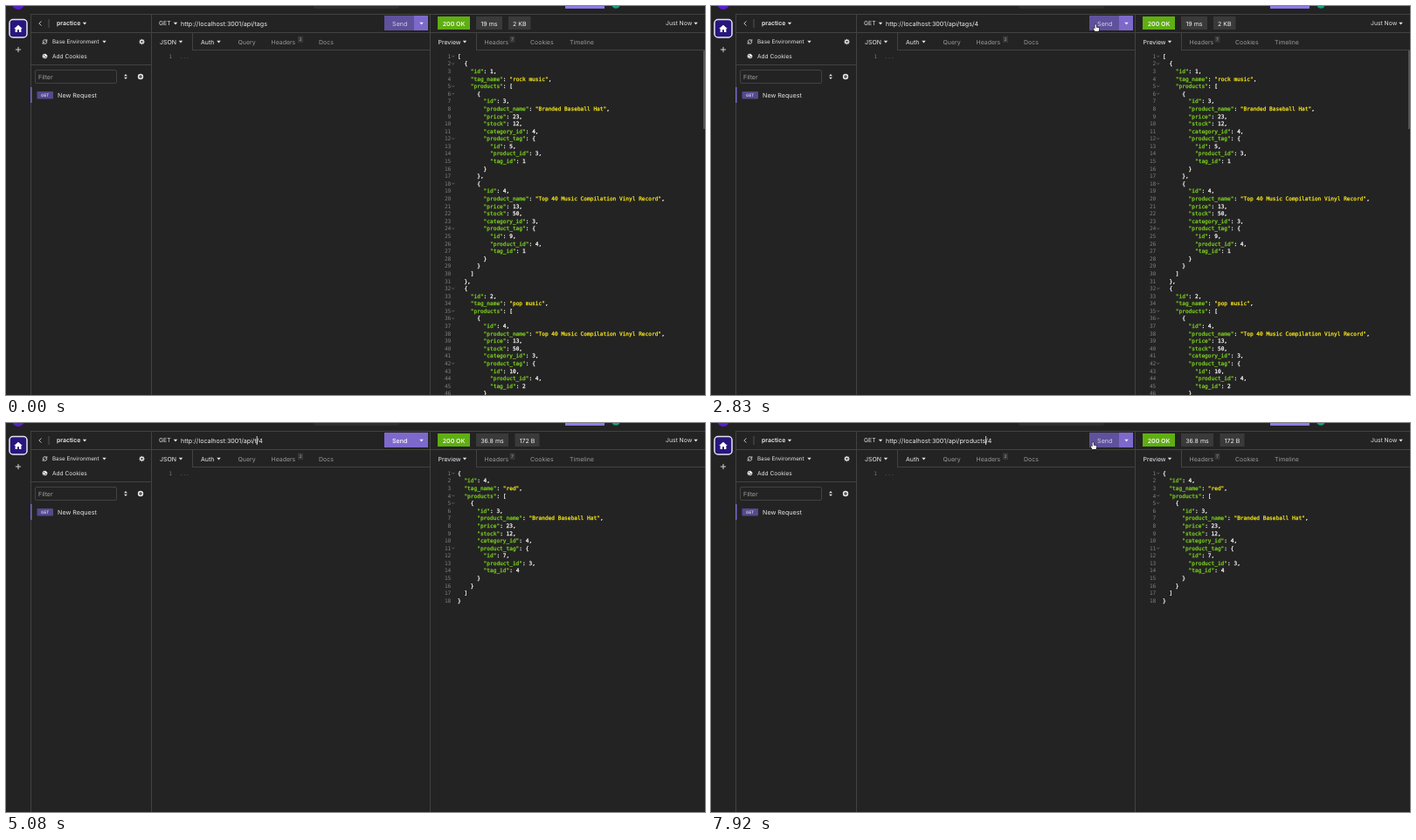
Write an HTML page with a canvas that moves like this. It is 800 px wide and 446 px high and loops after 8 s.

```html
<!DOCTYPE html>
<html lang="en">
<head>
<meta charset="utf-8">
<title>API client</title>
<style>
html, body { margin: 0; height: 100%; overflow: hidden; background: #232323; }
canvas { display: block; }
</style>
</head>
<body>
<canvas id="stage" width="800" height="446"></canvas>
<script>
const LOOP = 8000;
const ctx = document.getElementById('stage').getContext('2d');
const BG = '#232323', LINE = '#424242', TEXT = '#e4e4e4', MUTED = '#9a9a9a', PURPLE = '#7d69cb';
const UI = 'Inter, sans-serif';
const CODE = { size: 6.15, font: '"DejaVu Sans Mono", monospace' };
const CHAR = 3.702, ROW = 8.59;

// Response bodies
const hat = { id: 3, product_name: 'Branded Baseball Hat', price: 23, stock: 12, category_id: 4 };
const vinyl = { id: 4, product_name: 'Top 40 Music Compilation Vinyl Record', price: 13, stock: 50, category_id: 3 };
const tagged = (product, id, tag_id) =>
  ({ ...product, product_tag: { id, product_id: product.id, tag_id } });
const toLines = data => JSON.stringify(data, null, 2).split('\n').slice(0, 46);
const allTags = {
  time: '19 ms', size: '2 KB', boxes: [538, 30, 575, 25.5], scrolls: true,
  lines: toLines([
    { id: 1, tag_name: 'rock music', products: [tagged(hat, 5, 1), tagged(vinyl, 9, 1)] },
    { id: 2, tag_name: 'pop music', products: [tagged(vinyl, 10, 2)] }
  ])
};
const oneTag = {
  time: '36.8 ms', size: '172 B', boxes: [538, 37, 582.5, 28], scrolls: false,
  lines: toLines({ id: 4, tag_name: 'red', products: [tagged(hat, 7, 4)] })
};

// Address edits: [time, text before caret, text after caret]
const BASE = 'http://localhost:3001/api/';
const edits = [
  [0, 'tags', ''], [1000, 'tags', ''], [1750, 'tags/', ''], [1920, 'tags/4', ''],
  [4420, 'tags', '/4'], [4750, 'tag', '/4'], [4920, 'ta', '/4'], [5080, 't', '/4'], [5250, '', '/4'],
  [5580, 'p', '/4'], [5750, 'pr', '/4'], [5920, 'pro', '/4'], [6170, 'prod', '/4'], [6330, 'produ', '/4'],
  [6500, 'produc', '/4'], [6660, 'product', '/4'], [6750, 'products', '/4']
];
const RESPONSE_AT = 3080;
const focused = t => (t >= 1000 && t < 2950) || t >= 4420;

// Pointer moves: [time, x, y]; hidden outside each path
const paths = [
  [[300, 332, -8], [520, 318, 19.5], [1750, 318, 19.5]],
  [[2170, 318, 19.5], [2700, 441, 25], [3330, 441, 25], [4000, 292.5, 22], [4250, 293, 22], [4400, 300, 20], [4750, 300, 20]],
  [[7000, 300, 20], [7650, 438, 26], [8000, 438, 26]]
];

function pointerAt(t) {
  const path = paths.find(p => t >= p[0][0] && t < p[p.length - 1][0]);
  if (!path) return null;
  const i = path.findIndex(p => t < p[0]);
  const [t0, x0, y0] = path[i - 1], [t1, x1, y1] = path[i];
  const u = (t - t0) / (t1 - t0), k = u * u * (3 - 2 * u);
  return { x: x0 + (x1 - x0) * k, y: y0 + (y1 - y0) * k };
}

// Drawing helpers
function text(s, x, y, { size = 7, color = TEXT, weight = 400, font = UI, align = 'left', bolder = 0 } = {}) {
  ctx.font = `${weight} ${size}px ${font}`;
  ctx.fillStyle = ctx.strokeStyle = color;
  ctx.lineWidth = bolder;
  ctx.textAlign = align;
  if (bolder) ctx.strokeText(s, x, y + size * 0.36);
  ctx.fillText(s, x, y + size * 0.36);
}
function rect(x, y, w, h, color) {
  ctx.fillStyle = color;
  ctx.fillRect(x, y, w, h);
}
function shape(d, x, y, { fill, stroke, width = 1 }) {
  const path = new Path2D(d);
  ctx.save();
  ctx.translate(x, y);
  ctx.lineWidth = width;
  ctx.lineJoin = ctx.lineCap = 'round';
  if (stroke) { ctx.strokeStyle = stroke; ctx.stroke(path); }
  if (fill) { ctx.fillStyle = fill; ctx.fill(path); }
  ctx.restore();
}
function rounded(x, y, w, h, r, fill, stroke, width = 1) {
  ctx.beginPath();
  ctx.roundRect(x, y, w, h, r);
  if (fill) { ctx.fillStyle = fill; ctx.fill(); }
  if (stroke) { ctx.strokeStyle = stroke; ctx.lineWidth = width; ctx.stroke(); }
}
function disc(x, y, r, color) {
  ctx.beginPath();
  ctx.arc(x, y, r, 0, 7);
  ctx.fillStyle = color;
  ctx.fill();
}
const arrow = (x, y, color = TEXT) => shape('M-2.2-1.2H2.2L0 1.5Z', x, y, { fill: color });

function drawFrame() {
  disc(14, -3, 7, '#5a1fd1');
  rounded(352, -6, 98, 9, 2, '#2e2e2e');
  rect(640, 0, 45, 3, '#8f7be8');
  disc(698, -2, 4.8, '#12a184');
  for (const y of [9, 30]) rect(28, y, 772, 1, LINE);
  rect(167, 50, 633, 1, LINE);
  for (const x of [28, 166, 485]) rect(x, 9, 1, 437, LINE);
}

function drawSidebar() {
  rounded(4, 15.5, 20, 20.5, 4, '#27177c', '#e6e4f2', 1.5);
  shape('M0-4.2L4.8 0H3.4V4H1V1.2H-1V4H-3.4V0H-4.8Z', 14, 26, { fill: '#fff' });
  shape('M-2.7 0H2.7M0-2.7V2.7', 14, 50, { stroke: TEXT, width: 0.9 });

  shape('M1.2-2.2L-1.2 0L1.2 2.2', 39, 20, { stroke: TEXT, width: 0.8 });
  rect(48.5, 15, 1, 10, '#555');
  text('practice', 58, 20, { size: 6.9, weight: 600, color: '#eee' });
  arrow(90, 20);

  shape('M-2.3-.4A2.3 2.3 0 0 1 1.9-1.3M2.3-2.4V-.8H.7M2.3 .4A2.3 2.3 0 0 1-1.9 1.3M-2.3 2.4V.8H-.7', 44.5, 41, { stroke: TEXT, width: 0.8 });
  text('Base Environment', 53, 41, { size: 6.3 });
  arrow(112.5, 41);
  for (let i = 0; i < 4; i++) {
    const a = i * Math.PI / 4, dx = 2.8 * Math.cos(a), dy = 2.8 * Math.sin(a);
    shape(`M${-dx} ${-dy}L${dx} ${dy}`, 155.5, 41, { stroke: TEXT, width: 1.1 });
  }
  disc(155.5, 41, 2.3, TEXT);
  disc(155.5, 41, 1, BG);
  disc(44.5, 57.5, 2.8, TEXT);
  for (const [x, y] of [[43.6, 56.6], [45.6, 58.4], [43.7, 59], [46.8, 55.5]]) disc(x, y, 0.55, BG);
  text('Add Cookies', 53, 57.5, { size: 6.6 });
  rect(28, 67, 138, 1, LINE);

  rounded(33.5, 73.5, 93, 15, 1.5, null, LINE);
  text('Filter', 37, 81, { color: '#a0a0a0' });
  shape('M-1.9-.7H1.9L0-2.9ZM-1.9 .7H1.9L0 2.9Z', 137, 81, { fill: TEXT });
  disc(154, 81, 3.2, TEXT);
  shape('M-1.6 0H1.6M0-1.6V1.6', 154, 81, { stroke: BG, width: 0.9 });

  rect(28, 93, 1.5, 18, PURPLE);
  rounded(35.5, 98, 18.5, 8.5, 1, '#56498e');
  text('GET', 44.7, 102.2, { size: 4.6, weight: 500, color: '#eee', align: 'center' });
  text('New Request', 59, 102.2, { size: 7.15 });
}

function drawAddress(t) {
  const [at, before, after] = edits.findLast(e => t >= e[0]);
  text('GET', 175, 20, { size: 6.8 });
  arrow(194, 20);
  text(BASE + before + after, 200, 20, { size: 7.13, color: '#eee' });
  if (focused(t) && (t - at) % 1000 < 500) {
    rect(200 + ctx.measureText(BASE + before).width, 15, 0.8, 10, '#fff');
  }
  const typing = (t >= 1000 && t < 2600) || (t >= 4420 && t < 7550);
  rect(433, 11, 50, 17, PURPLE);
  if (!typing) rect(433, 11, 34, 17, '#5f519b');
  text('Send', 450.7, 20, { size: 7.1, weight: typing ? 500 : 400, color: typing ? '#fff' : '#d5cfee', align: 'center' });
  arrow(475.5, 20, '#eee');
}

function drawTabs() {
  rect(167, 50, 46, 1, BG);
  rect(486, 50, 52, 1, BG);
  for (const x of [213, 538]) rect(x, 31, 1, 20, LINE);
  const tab = (s, x, color = MUTED) => text(s, x, 41, { size: 6.95, color });
  tab('JSON', 176, '#eee');
  arrow(200, 41);
  tab('Auth', 223, '#eee');
  arrow(243.5, 41);
  tab('Query', 265.5);
  tab('Headers', 303.5);
  tab('Docs', 358);
  tab('Preview', 494.5, '#eee');
  arrow(525, 41);
  tab('Headers', 547.5);
  tab('Cookies', 600);
  tab('Timeline', 645);
  for (const [s, x] of [['2', 337], ['7', 579.5]]) {
    rect(x - 3, 34.5, 6, 7.5, '#363636');
    text(s, x, 38.2, { size: 5, color: '#aaa', align: 'center' });
  }
  text('1', 190, 57.5, { ...CODE, color: '#777', align: 'right' });
  text('...', 198.5, 57.5, { ...CODE, color: '#666' });
}

function badge(label, x, w, color, weight = 400) {
  rect(x, 12, w, 15, color);
  text(label, x + w / 2, 20, { size: 7, weight, color: '#f2f2f2', align: 'center' });
}

function drawResponse({ time, size, boxes, scrolls, lines }) {
  const [timeX, timeW, sizeX, sizeW] = boxes;
  badge('200 OK', 494, 37, '#5fae12', 600);
  badge(time, timeX, timeW, '#3a3a3a');
  badge(size, sizeX, sizeW, '#3a3a3a');
  text('Just Now', 755, 20, { size: 6.8 });
  arrow(789.5, 20);
  if (scrolls) rect(798, 51, 2, 90, '#555');

  lines.forEach((line, i) => {
    const y = 57.6 + i * ROW;
    text(i + 1, 509.3, y, { ...CODE, color: '#808080', align: 'right' });
    if (/[[{]$/.test(line)) shape('M-1.2-.5L0 .7L1.2-.5', 511.7, y, { stroke: '#888', width: 0.6 });
    for (const [token, colon] of line.matchAll(/"[^"]*"(:?)|[^"\s]+/g)) {
      const x = 517 + line.indexOf(token) * CHAR;
      const put = (s, dx, color) => text(s, x + dx, y, { ...CODE, color, bolder: 0.25 });
      if (colon) {
        const key = token.slice(0, -1);
        put(key, 0, '#7ed321');
        put(':', key.length * CHAR, '#fff');
      } else {
        put(token, 0, token[0] === '"' ? '#f8e71c' : '#fff');
      }
    }
  });
}

function drawPointer(t) {
  const p = pointerAt(t);
  if (!p) return;
  if (p.x > 433) {
    const hand = 'M-1.6 4L-3.3 1.2Q-3.6 0-2.4 .4L-1.5 1.2V-3.4Q-.8-4.4-.1-3.4V-.6L2.6 0Q3.5 .4 3.3 1.4L2.5 4Z';
    shape(hand, p.x, p.y, { fill: '#fff', stroke: '#111', width: 1.2 });
  } else {
    const beam = 'M-2-4.3Q0-4.3 0-3Q0-4.3 2-4.3M0-3V3M-2 4.3Q0 4.3 0 3Q0 4.3 2 4.3M-1 1H1';
    shape(beam, p.x, p.y, { stroke: '#eee', width: 2 });
    shape(beam, p.x, p.y, { stroke: '#111', width: 0.9 });
  }
}

function draw(now) {
  const t = now % LOOP;
  ctx.textRendering = 'geometricPrecision';
  ctx.lineJoin = 'round';
  rect(0, 0, 800, 446, BG);
  drawFrame();
  drawSidebar();
  drawAddress(t);
  drawTabs();
  drawResponse(t < RESPONSE_AT ? allTags : oneTag);
  drawPointer(t);
  requestAnimationFrame(draw);
}
requestAnimationFrame(draw);
</script>
</body>
</html>
```
